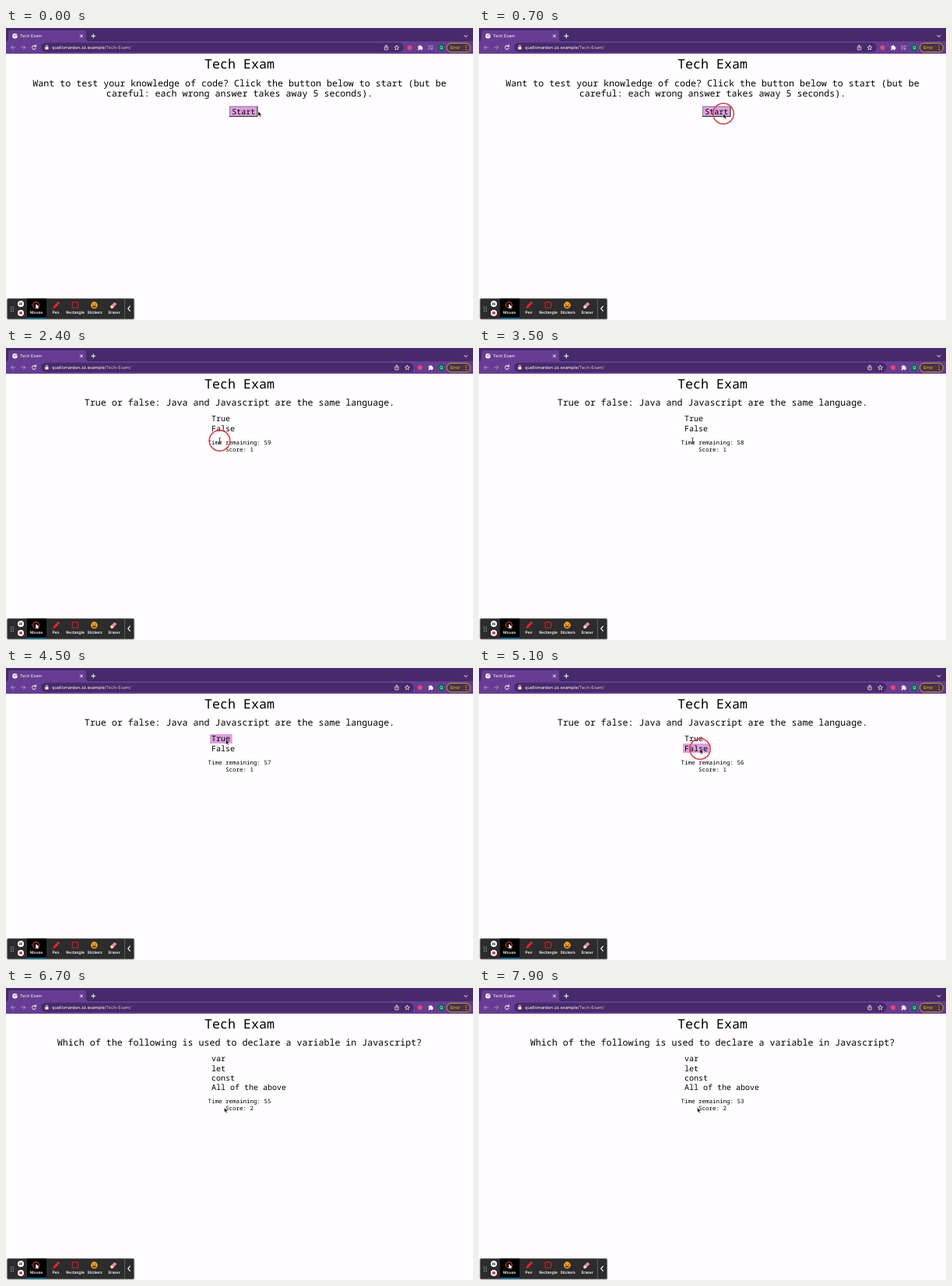
These frames come from a looping animation (600 px wide and 375 px high, 8 s). An HTML page:

```html
<!DOCTYPE html>
<html lang="en">
<head>
<meta charset="utf-8">
<title>Tech Exam</title>
<style>
  html, body { margin: 0; width: 100%; height: 100%; overflow: hidden; background: #fffdff; }
  svg { display: block; width: 600px; height: 375px; }
  text { text-rendering: geometricPrecision; }
  .page text { font-family: "Noto Sans Mono", monospace; fill: #000; }
  .ui text { font-family: Inter, "Open Sans", sans-serif; fill: #fff; }
  .mid { text-anchor: middle; }
  .title { font-size: 16.67px; }
  .ask { font-size: 11.67px; }
  .opt { font-size: 10px; }
  .stat { font-size: 7.5px; }
  .line { fill: none; stroke: #fff; stroke-width: 1; stroke-linecap: round; stroke-linejoin: round; }
  .dim { opacity: .4; }
  .tool text { font-size: 4.9px; font-weight: 600; text-anchor: middle; }
</style>
</head>
<body>
<svg viewBox="0 0 600 375">
  <rect width="600" height="375" fill="#fffdff"/>

  <g class="ui">
    <rect width="600" height="33" fill="#472a69"/>
    <rect y="17" width="600" height="16" fill="#673c93"/>
    <path d="M0 17Q3 17 3 14V6Q3 3 6 3H100Q103 3 103 6V14Q103 17 106 17Z" fill="#673c93"/>
    <circle cx="11.5" cy="10.3" r="3.2" fill="#fff"/>
    <path d="M9.4 9.4l2 .7.6 1.6M12 7.8l.6 1.2 1.6.3" fill="none" stroke="#673c93" stroke-width=".8"/>
    <text x="18" y="12.3" font-size="5.4">Tech Exam</text>
    <path class="line" d="M95.3 8.7l3.2 3.2m0-3.2l-3.2 3.2M109.7 10.3h5m-2.5-2.5v5M588.8 9.5l2 2 2-2"/>
    <path class="line dim" d="M11.8 25H6.6m2.4-2.4L6.6 25 9 27.4M19.6 25h5.2m-2.4-2.4l2.4 2.4-2.4 2.4"/>
    <path class="line" d="M38 23.4a2.5 2.5 0 1 0 .4 2.4M38.4 21.8v2h-2"/>
    <rect x="45" y="19" width="466" height="12" rx="6" fill="#472a69"/>
    <rect x="50.3" y="24.2" width="4.2" height="3.4" rx=".5" fill="#fff"/>
    <path class="line" stroke-width=".7" d="M51.2 24v-.8a1.2 1.2 0 0 1 2.4 0v.8" style="stroke-width:.7"/>
    <text x="59" y="27.1" font-size="5.6">quellomarden.zz.example<tspan fill="#d3c6e0">/Tech-Exam/</tspan></text>

    <g id="early">
      <use href="#share" x="488.5"/><use href="#star" x="502"/>
      <circle cx="518.5" cy="25.2" r="3" fill="#e8476a"/>
      <use href="#puzzle" x="532"/>
      <path class="line dim" d="M542.5 23h5.5m-5.5 2h3.6m-3.6 2h2.5M547.8 23.2v3.6"/>
      <circle cx="546.9" cy="27" r="1.1" fill="#fff" opacity=".5"/>
    </g>
    <g id="late">
      <rect x="490" y="19" width="34" height="12" rx="6" fill="#472a69"/>
      <use href="#share" x="502"/><use href="#star" x="515.5"/>
      <circle cx="532" cy="25.2" r="3" fill="#e8476a"/>
      <use href="#puzzle" x="545.5"/>
    </g>

    <circle cx="559.2" cy="25.2" r="4.6" fill="#0d6b58"/>
    <text class="mid" x="559.2" y="27.2" font-size="5.4">Q</text>
    <rect x="566.5" y="19.5" width="30" height="11.4" rx="5.7" fill="#4a3445" stroke="#d6a53c" stroke-width=".9"/>
    <text x="571" y="27.1" font-size="5.3" style="fill:#f5c860">Error</text>
    <path d="M591 22.6v.01m0 2.5v.01m0 2.5v.01" stroke="#f5c860" stroke-width="1.3" stroke-linecap="round"/>
  </g>

  <defs>
    <path id="share" class="line" d="M-1.2 24h-1v4h4.4v-4h-1M0 26v-4m-1.2 1.1L0 21.9l1.2 1.2" style="stroke-width:.7"/>
    <path id="star" class="line" d="M0 22.3l.9 1.9 2.1.2-1.6 1.4.5 2.1L0 26.8l-1.9 1.1.5-2.1L-3 24.4l2.1-.2z" style="stroke-width:.7"/>
    <path id="puzzle" d="M-2.7 23.2h1.6a1.1 1.1 0 0 1 2.2 0h1.4v1.6a1.1 1.1 0 0 1 0 2.2v1.3h-1.6a1 1 0 0 0-2 0h-1.6v-1.6a1 1 0 0 0 0-2z" fill="#fff"/>
  </defs>

  <g class="page">
    <text class="title mid" x="300" y="51.6">Tech Exam</text>
    <g id="intro">
      <text class="ask mid" x="300" y="75.2">Want to test your knowledge of code? Click the button below to start (but be</text>
      <text class="ask mid" x="300" y="88.2">careful: each wrong answer takes away 5 seconds).</text>
      <rect x="287" y="100.5" width="36.3" height="13.3" fill="#dda0dd"/>
      <path d="M287.4 114V100.9H323" fill="none" stroke="#8d7a8d" stroke-width=".9"/>
      <path d="M287 113.6H323V100.5" fill="none" stroke="#222" stroke-width="1"/>
      <text class="opt mid" x="305.2" y="110.6">Start</text>
    </g>
    <g id="quiz">
      <text id="ask" class="ask mid" x="300" y="74.2"></text>
      <rect id="hover" x="262" height="12" fill="#dda0dd"/>
      <g id="opts"></g>
      <g id="stats">
        <text id="time" class="stat mid" x="300"></text>
        <text id="score" class="stat mid" x="300"></text>
      </g>
    </g>
  </g>

  <g class="ui tool">
    <rect x=".5" y="347" width="165" height="28" rx="2" fill="#777" opacity=".35"/>
    <rect x="1.5" y="347.5" width="163" height="26.3" rx="1.5" fill="#2c2c2e"/>
    <path d="M6.7 358.3v.01m0 2.6v.01m0 2.6v.01m2.6-5.23v.01m0 2.6v.01m0 2.6v.01" stroke="#ddd" stroke-width="1.2" stroke-linecap="round"/>
    <circle cx="19" cy="354.3" r="4" fill="#fff"/>
    <path d="M17.9 352.6v3.4m2.2-3.4v3.4" stroke="#222" stroke-width="1.1"/>
    <circle cx="19" cy="366" r="4" fill="#fff"/>
    <rect x="17.3" y="364.3" width="3.4" height="3.4" fill="#e0202c"/>
    <rect x="27" y="347.5" width="25" height="26" fill="#000"/>
    <rect x="27" y="372.2" width="25" height="1.3" fill="#1a97c9"/>
    <circle cx="38.5" cy="355.7" r="3.9" fill="none" stroke="#e8404a" stroke-width="1.1"/>
    <path d="M38.3 354.2v6.2l1.5-1.3 1 2 1-.5-.9-2h2z" fill="#fff"/>
    <path d="M60.3 360.2l.8-3 4.2-4.6 2.4 2.2-4.3 4.6z" fill="#e8202c"/>
    <path d="M65.8 352l.8-.8 2.4 2.2-.8.8z" fill="#ff5b5b"/>
    <rect x="85.2" y="352.3" width="7.4" height="7" fill="none" stroke="#e01824" stroke-width="1.1"/>
    <circle cx="113.3" cy="356" r="4.4" fill="#f8a51b"/>
    <path d="M111.7 354.6v.6m3.2-.6v.6" stroke="#432" stroke-width="1" stroke-linecap="round"/>
    <path d="M110.8 356.7h5a2.5 2.3 0 0 1-5 0z" fill="#5a2a14"/>
    <path d="M134 357.6l5.4-5.5 3 2.5-5.4 5.5-2 .1z" fill="#f08a94"/>
    <path d="M134 357.6l1.6-1.6 3 2.5-1.6 1.6-2 .1z" fill="#f6d5d8"/>
    <text x="39" y="367.4">Mouse</text>
    <text x="64" y="367.4">Pen</text>
    <text x="89" y="367.4">Rectangle</text>
    <text x="114" y="367.4">Stickers</text>
    <text x="139" y="367.4">Eraser</text>
    <path d="M152.3 347.5v26" stroke="#77777a" stroke-width=".7"/>
    <path class="line" d="M159.3 357.4l-2.6 3 2.6 3" style="stroke-width:1.2"/>
  </g>

  <circle id="ring" r="13.3" fill="none" stroke="#d8404c" stroke-width="1.5"/>
  <g id="cursor">
    <path id="arrow" d="M0 0V6.2L1.5 4.9 2.6 7.2 3.7 6.7 2.6 4.5H4.5Z" fill="#000" stroke="#fff" stroke-width=".5"/>
    <path id="beam" d="M-1.5-3.4Q0-3.4 0-2.4Q0-3.4 1.5-3.4M0-2.4V2.6M-1.5 3.6Q0 3.6 0 2.6Q0 3.6 1.5 3.6M-.8 .8H.8" fill="none" stroke="#222" stroke-width=".8"/>
  </g>
</svg>

<script>
const LOOP = 8000, START = 800, TICK = 1000, ROW = 12.1;
const $ = id => document.getElementById(id);

const questions = [
  { at: START, ask: "Which of the following is NOT a language used for building pages?",
    opts: ["HTML", "CSS", "SQL", "Javascript"] },
  { at: 2300, ask: "True or false: Java and Javascript are the same language.",
    opts: ["True", "False"] },
  { at: 5150, ask: "Which of the following is used to declare a variable in Javascript?",
    opts: ["var", "let", "const", "All of the above"] }
];
const clicks = [START, 2300, 5150];
const RING_LEAD = 100, RING_LIFE = 450;

// time, x, y of the pointer
const path = [
  [0, 324, 107], [300, 324, 107], [700, 314, 110], [1600, 314, 110],
  [2150, 274.5, 119], [3800, 274.5, 119], [4300, 282.5, 92], [4700, 282.5, 92],
  [5050, 284, 104], [5300, 284, 104], [5650, 284, 133.3], [5750, 284, 133.5],
  [6100, 283, 150.5], [6700, 280.5, 153.5], [LOOP, 280.5, 153.5]
];

function pointer(t) {
  const i = path.findIndex(p => p[0] > t);
  const [t0, x0, y0] = path[i - 1], [t1, x1, y1] = path[i];
  const k = (t - t0) / (t1 - t0), e = k * k * (3 - 2 * k);
  return [x0 + (x1 - x0) * e, y0 + (y1 - y0) * e];
}

const show = (id, on) => $(id).style.display = on ? "" : "none";
const inside = (x, y, l, t, r, b) => x >= l && x <= r && y >= t && y <= b;

let shown = -1;
function fillQuestion(n) {
  if (n === shown) return;
  shown = n;
  const { ask, opts } = questions[n];
  $("ask").textContent = ask;
  $("opts").innerHTML = opts.map((o, i) =>
    `<text class="opt" x="264" y="${94.4 + i * ROW}">${o}</text>`).join("");
  const base = 99.9 + opts.length * ROW;
  $("time").setAttribute("y", base);
  $("score").setAttribute("y", base + 8.5);
  $("score").textContent = "Score: " + n;
}

function drawHover(opts, x, y) {
  const i = opts.findIndex((o, n) =>
    inside(x, y, 262, 85 + n * ROW, 266 + o.length * 6, 97.3 + n * ROW));
  show("hover", i >= 0);
  if (i < 0) return;
  $("hover").setAttribute("y", 85 + i * ROW);
  $("hover").setAttribute("width", opts[i].length * 6 + 4.6);
}

function draw(t) {
  const [x, y] = pointer(t);
  const n = questions.filter(q => t >= q.at).length - 1;
  const ticks = Math.floor((t - START) / TICK);
  let overText = false;

  show("early", t < 2200);
  show("late", t >= 2200);
  show("intro", n < 0);
  show("quiz", n >= 0);
  if (n >= 0) {
    const { opts } = questions[n];
    fillQuestion(n);
    drawHover(opts, x, y);
    show("stats", ticks > 0);
    $("time").textContent = "Time remaining: " + (60 - ticks);
    const base = 99.9 + opts.length * ROW;
    overText = ticks > 0 && inside(x, y, 259, base - 7, 341, base + 1.5);
  }

  show("arrow", !overText);
  show("beam", overText);
  $("cursor").setAttribute("transform", `translate(${x} ${y})`);

  const click = clicks.find(c => t >= c - RING_LEAD && t < c - RING_LEAD + RING_LIFE);
  show("ring", click !== undefined);
  if (click !== undefined) {
    const left = (click - RING_LEAD + RING_LIFE - t) / 150;
    const [cx, cy] = pointer(click);
    $("ring").setAttribute("cx", cx);
    $("ring").setAttribute("cy", cy);
    $("ring").setAttribute("opacity", Math.min(1, left));
  }
}

const begin = performance.now();
function frame() {
  draw((performance.now() - begin) % LOOP);
  requestAnimationFrame(frame);
}
frame();
</script>
</body>
</html>
```
